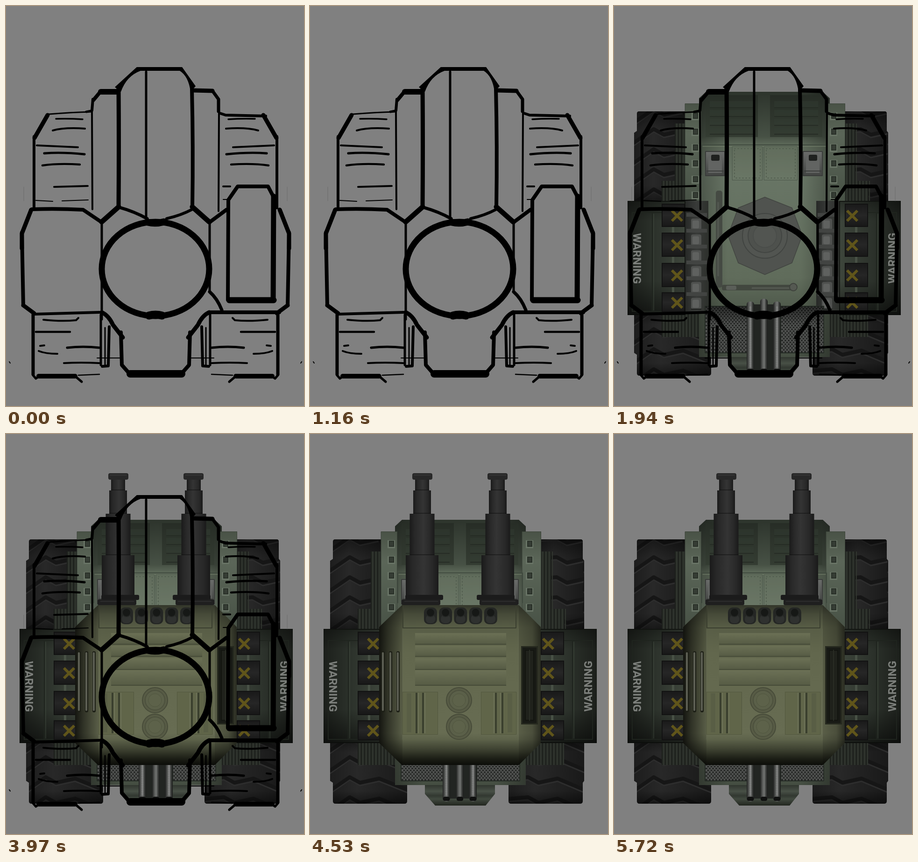
An HTML page with a canvas that plays this animation: 638x858 px, repeating every 6.52 s.

```html
<!DOCTYPE html>
<html lang="en">
<head>
<meta charset="utf-8">
<title>Tank build-up</title>
<style>
html, body { margin: 0; width: 100%; height: 100%; overflow: hidden; background: #808080; }
canvas { display: block; width: 638px; height: 858px; }
</style>
</head>
<body>
<canvas id="stage" width="638" height="858"></canvas>
<script>
const W = 638, H = 858, LOOP = 6520;
let c;

function layer(paint) {
  const cv = document.createElement('canvas');
  cv.width = W; cv.height = H;
  c = cv.getContext('2d');
  c.lineCap = c.lineJoin = 'round';
  paint();
  return cv;
}

function rect(x, y, w, h, fill, edge, lw = 1) {
  c.fillStyle = fill;
  c.fillRect(x, y, w, h);
  if (edge) {
    c.strokeStyle = edge; c.lineWidth = lw;
    c.strokeRect(x + lw / 2, y + lw / 2, w - lw, h - lw);
  }
}
function round(x, y, w, h, r, fill) {
  c.fillStyle = fill;
  c.beginPath(); c.roundRect(x, y, w, h, r); c.fill();
}
function disc(x, y, r, fill, edge, lw = 2) {
  c.beginPath(); c.arc(x, y, r, 0, 7);
  c.fillStyle = fill; c.fill();
  if (edge) { c.strokeStyle = edge; c.lineWidth = lw; c.stroke(); }
}
function shape(d, fill) {
  c.fillStyle = fill;
  c.fill(new Path2D(d));
}
function line(d, w, color) {
  c.strokeStyle = color; c.lineWidth = w;
  c.stroke(new Path2D(d));
}
// Linear gradient; stops alternate position and colour.
function grad(x0, y0, x1, y1, ...stops) {
  const g = c.createLinearGradient(x0, y0, x1, y1);
  for (let i = 0; i < stops.length; i += 2) g.addColorStop(stops[i], stops[i + 1]);
  return g;
}
const across = (x0, x1, ...s) => grad(x0, 0, x1, 0, ...s);
const down = (y0, y1, ...s) => grad(0, y0, 0, y1, ...s);
function mirrored(axis, draw) {
  draw();
  c.save();
  c.translate(2 * axis, 0); c.scale(-1, 1);
  draw();
  c.restore();
}

// ---------- hull ----------
function tyre(d, x0, x1, y0, y1, tilt) {
  c.save();
  c.clip(new Path2D(d));
  rect(x0, y0, x1 - x0, y1 - y0, across(x0, x1, 0, '#1d1d1d', .35, '#282828', 1, '#191919'));
  for (let y = y0 - 8; y < y1 + 60; y += 43) {
    const zig = o => `M${x0} ${y + o + 32 * tilt}L${x0 + 42} ${y + o + 3}L${x0 + 64} ${y + o + 15}L${x0 + 105} ${y + o + 6}L${x1} ${y + o + 30}`;
    line(zig(6), 3, '#2d2d2d');
    line(zig(0), 8, '#161616');
  }
  rect(x0, y0, x1 - x0, y1 - y0, down(y0, y1, 0, '#0006', .2, '#0000', .8, '#0000', 1, '#0007'));
  c.restore();
}

function ribs(x, y, w, h) {
  rect(x, y, w, h, '#282c27');
  for (let i = 0; i < w; i += 7) {
    rect(x + i, y, 2, h, '#1c1f1b');
    rect(x + i + 3, y, 2, h, '#30352e');
  }
}

function crate(x, y, h, markX) {
  rect(x, y, 50, h, down(y, y + h, 0, '#191919', .5, '#262626', 1, '#171717'), '#121212', 2);
  const m = y + h / 2 + 1;
  c.lineCap = 'butt';
  line(`M${markX - 11} ${m - 11}L${markX + 11} ${m + 11}M${markX + 11} ${m - 11}L${markX - 11} ${m + 11}`, 6, '#60551a');
  c.lineCap = 'round';
}

function mesh(x, y, w, h) {
  rect(x, y, w, h, '#5e605e');
  c.fillStyle = '#2c2e2c';
  for (let r = 0; r * 4 < h - 2; r++)
    for (let i = 0; i * 7 < w - 5; i++)
      c.fillRect(x + 2 + i * 7 + (r % 2) * 3.5, y + 1 + r * 4, 4, 3);
  rect(x, y, w, h, down(y, y + h, 0, '#0008', .4, '#0002', 1, '#0002'), '#252b25', 2);
}

function warning(x, y, turn) {
  c.save();
  c.translate(x, y); c.rotate(turn);
  c.font = 'bold 24px Roboto, Arial, sans-serif';
  c.textAlign = 'center';
  c.fillStyle = '#7c7f7b';
  c.fillText('WARNING', 0, 0);
  c.restore();
}

function hull() {
  tyre('M54 226H160V425H43V272L49 268V231Q49 226 54 226Z', 43, 160, 226, 425, 1);
  tyre('M486 226H579Q584 226 584 231V268L587 272V425H486Z', 486, 587, 226, 425, .2);
  tyre('M43 655H208V787Q208 793 202 793H55Q49 793 49 787V748L43 744Z', 43, 208, 655, 793, 1);
  tyre('M425 655H587V744L584 748V787Q584 793 578 793H431Q425 793 425 787Z', 425, 587, 655, 793, .2);

  ribs(130, 252, 24, 126);
  ribs(102, 375, 52, 45);
  ribs(102, 660, 82, 50);
  ribs(494, 252, 22, 126);
  ribs(494, 375, 50, 45);
  ribs(462, 660, 82, 50);

  shape('M246 750H396V772L376 797H268L246 772Z',
    down(750, 797, 0, '#2b302a', .35, '#485046', .55, '#323831', .7, '#41493f', 1, '#22261f'));
  const deck = 'M197 184H447L462 198V753H182V198Z';
  shape(deck, down(184, 753, 0, '#2d342c', .17, '#475145', .2, '#5d6959', .32, '#687565', .7, '#606c5b', .85, '#4a5447', 1, '#454e42'));
  shape(deck, across(182, 462, 0, '#0004', .22, '#0000', .78, '#0000', 1, '#0004'));

  // Rails with square notches
  for (const [x, w, slot] of [[152, 35, 166], [454, 41, 462]]) {
    rect(x, 209, w, 215, down(209, 424, 0, '#495246', .3, '#5b6658', 1, '#475145'), '#3c443a');
    for (let i = 0; i < 6; i++) {
      rect(slot, 228 + i * 34, 16, 17, '#687365');
      rect(slot + 3, 229 + i * 34, 11, 13, '#353c34', '#293028', 2);
    }
  }

  // Engine deck
  for (const x of [196, 334]) {
    rect(x, 191, 112, 90, down(191, 281, 0, '#272d26', 1, '#343c32'));
    for (let i = 0; i < 4; i++) {
      rect(x + 9, 204 + i * 19, 94, 14, '#343c3266');
      rect(x + 9, 217 + i * 19, 94, 2, '#262c25');
    }
  }
  line('M188 298H455M188 298V362M455 298V362', 2, '#3f493e');
  line('M190 301H453', 1, '#78846f');
  for (const [x, w] of [[253, 65], [321, 72]]) {
    rect(x, 301, w, 73, '#6d796733', '#4c574a');
    c.setLineDash([2, 5]);
    line(`M${x + 5} 306h${w - 10}v63h${10 - w}z`, 1.5, '#4c574a');
    c.setLineDash([]);
  }
  for (const x of [195, 404]) {
    rect(x, 311, 43, 54, down(311, 365, 0, '#6b6d6b', .4, '#5a5c5a', 1, '#424442'), '#3a3c3a', 2);
    shape(`M${x + 7} 358V326Q${x + 22} 310 ${x + 36} 326V358Z`, '#626462');
    round(x + 13, 319, 18, 13, 3, '#1f211f');
    line(`M${x + 4} 354H${x + 39}`, 2, '#3a3c3a');
  }

  // Turret ring
  const ring = 'M323 410L381 433L403 492L381 551L323 576L266 551L244 492L266 433Z';
  shape(ring, '#50534f');
  line(ring, 1.5, '#424541');
  disc(323, 493, 48, '#525551', '#414441');
  disc(323, 493, 36, '#4e514d', '#424542');
  disc(323, 493, 25, '#525551', '#4a4d4a');

  // Tools
  round(218, 396, 14, 208, 5, '#454a43');
  round(221, 420, 4, 160, 2, '#50554e');
  round(231, 598, 154, 12, 4, '#42473f');
  round(240, 600, 22, 9, 3, '#5a5e58');
  line('M296 605H374', 3, '#555a52');
  disc(384, 603, 8, '#555952', '#3e423c');

  // Bolt columns
  for (const [x, bx] of [[152, 165], [433, 445]]) {
    rect(x, 418, 50, 242, across(x, x + 50, 0, '#272927', .5, '#393b39', 1, '#2d302c'));
    for (let i = 0; i < 6; i++) {
      const y = 456 + i * 34;
      rect(x + 3, y - 12, 44, 8, '#424442');
      round(bx, y, 22, 24, 4, '#4f514f');
      round(bx + 3, y + 4, 14, 17, 3, '#5f615f');
      rect(bx, y + 23, 22, 3, '#242624');
    }
  }

  // Side armour
  const plate = (x, w, outer, inner) => {
    rect(x, 418, w, 245, across(x, x + w, 0, outer, .5, '#2d332c', 1, inner), '#191d18', 2);
    rect(x, 418, w, 245, down(418, 663, 0, '#0005', .18, '#0000', .7, '#0000', 1, '#0008'));
  };
  plate(29, 124, '#1c1f1b', '#3e463c');
  plate(482, 132, '#3e463c', '#1c1f1b');
  line('M39 443H82V655H39ZM82 443H102M82 655H102', 2, '#1f241e');
  line('M85 446V653', 1, '#414a3f');
  line('M605 443H562V655H605ZM562 443H544M562 655H544', 2, '#1f241e');
  line('M565 446V653', 1, '#414a3f');
  for (const [y, h] of [[424, 50], [486, 52], [551, 52], [614, 43]]) {
    crate(102, y, h, 135);
    crate(494, y, h, 510);
    if (y < 614) {
      rect(124, y + h, 5, 13, '#485145');
      rect(516, y + h, 5, 13, '#485145');
    }
  }
  warning(40.5, 541.5, Math.PI / 2);
  warning(604, 541, -Math.PI / 2);

  // Rear grille and exhausts
  mesh(194, 643, 92, 102);
  mesh(356, 643, 94, 102);
  rect(284, 640, 73, 142, '#222522');
  for (const [x, y] of [[292, 634], [321, 628], [349, 634]]) {
    round(x - 8, y, 16, 154, 6, across(x - 8, x + 8, 0, '#202120', .3, '#585a58', .55, '#727472', .75, '#414341', 1, '#181a18'));
    c.setLineDash([2, 3]);
    if (x !== 321) line(`M${x} ${y + 12}V776`, 4, '#9a9c9a66');
    c.setLineDash([]);
    round(x - 7, 778, 14, 9, 4, '#101110');
  }
}

// ---------- turret ----------
function barrel() {
  const x = 240;
  const metal = (w, y0, y1) => {
    rect(x - w / 2, y0, w, y1 - y0, across(x - w / 2, x + w / 2, 0, '#1a1a1a', .2, '#282828', .55, '#343434', .8, '#292929', 1, '#1a1a1a'));
    rect(x - w / 2, y1 - 3, w, 3, '#1118');
  };
  metal(30, 96, 122);
  metal(38, 121, 172);
  metal(53, 171, 261);
  metal(70, 260, 349);
  round(x - 21, 84, 43, 14, 4, '#282828');
  rect(x - 18, 87, 36, 2, '#363636');
  round(x - 36, 345, 81, 11, 3, '#1b1b1b');
  round(x - 44, 355, 83, 12, 3, '#1f1f1f');
  rect(x - 38, 358, 72, 2, '#2d2d2d');
}

function turret() {
  mirrored(321, barrel);
  const body = 'M197 367H447L494 414V663L447 710H197L148 663V414Z';
  shape(body, down(367, 710, 0, '#33362a', .06, '#474b39', .14, '#585d46', .3, '#62674d', .8, '#676c52', .9, '#4f543f', 1, '#26291c'));
  c.save();
  c.clip(new Path2D(body));
  rect(148, 367, 50, 343, across(148, 198, 0, '#000c', .35, '#0008', 1, '#0002'));
  rect(447, 367, 48, 343, across(447, 495, 0, '#0002', .6, '#0004', 1, '#0009'));
  rect(148, 655, 347, 55, down(655, 710, 0, '#0000', .5, '#0004', 1, '#000a'));
  c.restore();
  line('M199 370V416H441V370', 2, '#3a3e2f');
  line('M198 418V655M446 418V655', 1, '#6c725a66');

  for (const [y, h] of [[427, 23], [454, 22], [481, 23], [507, 31]]) {
    rect(225, y, 195, h, down(y, y + h, 0, '#6b7055', .25, '#666b51', 1, '#575c45'));
    rect(225, y + h, 195, 2, '#464b38');
  }
  mirrored(320, () => {
    rect(198, 553, 76, 92, '#606549', '#52573f');
    for (const x of [226, 240]) {
      rect(x, 555, 4, 87, '#3a3f2e');
      rect(x + 5, 555, 2, 87, '#6c7157');
    }
    rect(207, 556, 10, 84, '#595e45');
  });
  for (const y of [571, 628]) {
    disc(319, y, 27, '#575b45', '#474b39', 2);
    disc(319, y, 21, '#5b6049', '#4c503d', 2);
    disc(319, y, 14, '#5d624a', '#51563f', 1);
  }
  for (const x of [156, 172, 188]) {
    round(x - 3, 466, 7, 131, 3, '#1c1e15');
    round(x - 2, 468, 4, 126, 2, '#5c5e53');
  }
  rect(452, 455, 36, 168, '#181a15', '#25281e', 3);
  rect(460, 463, 20, 152, '#1f211b', '#12140f', 2);
  rect(469, 463, 2, 152, '#2a2d25');
  for (let i = 0; i < 5; i++) {
    const x = 258 + i * 32.2;
    round(x - 14, 372, 28, 36, 10, '#242624');
    round(x - 10, 388, 20, 18, 8, '#2f312f');
    disc(x, 383, 9, '#161816', '#252725');
  }
}

// ---------- sketch ----------
const bothSides = [
  [9, 'M89 234L61 283'], [6, 'M60 280V433'],
  [3.5, 'M107 242Q135 241 164 243'], [4, 'M100 267Q125 260 169 263'],
  [4, 'M66 299Q110 301 154 303'], [5, 'M82 316Q120 313 168 318'],
  [4.5, 'M78 342Q112 337 158 340'],
  [9, 'M54 437L34 488V520'], [8, 'M34 486L37 642'], [9, 'M37 642L60 659'],
  [7, 'M58 662V790'], [10, 'M70 794H148'], [5, 'M148 794L162 806M58 792L64 799L70 795'],
  [2.5, 'M155 792L200 790'],
  [4, 'M80 673Q120 677 150 674L155 669'], [4.5, 'M64 699H137'],
  [4, 'M73 729L82 728M70 740Q84 746 110 746'], [5, 'M131 733Q165 729 200 733'],
  [4, 'M124 766Q160 764 200 766'],
  [5, 'M203 662V770'], [9, 'M205 657Q220 664 229 684L250 711'],
  [6, 'M221 688L219 772L206 773'], [3, 'M212 690V770'], [2, 'M195 755H245'],
  [8, 'M246 700L248 770L262 786'], [11, 'M241 431L205 463'],
  [2, 'M7 763L9 766']
];
const single = [
  [12, 'M238 184H203'], [8, 'M202 184L187 202'], [6, 'M186 200L184 224'], [4, 'M184 222L185 436'],
  [9, 'M241 174Q242 300 241 432'], [8, 'M398 178Q401 300 399 432'],
  [9, 'M402 181L442 182'], [7, 'M442 182L455 200V226'], [4, 'M456 226L455 440'],
  [5, 'M300 141V452'], [7, 'M243 432Q275 441 302 456'], [6, 'M399 436Q375 449 344 456'],
  [15, 'M304 464Q320 468 338 463'],
  [3, 'M92 232Q140 228 182 227'], [5, 'M172 227L182 225'], [6, 'M458 230L470 234L556 236'],
  [4, 'M103 388L175 386M465 387H480'], [2, 'M64 417L100 419M120 418L176 416M465 415H475'],
  [8, 'M56 436Q110 434 165 437L205 464'], [5, 'M205 465V672'], [6, 'M60 661L200 657'],
  [8, 'M437 463L472 437'], [5, 'M436 465V612'], [7, 'M436 613Q452 627 462 652'],
  [8, 'M438 657H585'],
  [8, 'M475 630L476 416L496 387H561L573 410'], [11, 'M573 408L572 630'], [13, 'M478 631H573'],
  [16, 'M266 789H376'],
  [17, 'M306 664Q320 660 334 664']
];
function sketch() {
  c.filter = 'blur(0.7px)';
  mirrored(320, () => bothSides.forEach(([w, d]) => line(d, w, '#000')));
  single.forEach(([w, d]) => line(d, w, '#000'));
  shape('M280 131H377L406 172L395 184Q391 151 372 139H288Q258 150 246 184L233 174Z', '#000');
  c.lineWidth = 13;
  c.beginPath();
  c.ellipse(320, 564, 115, 101, 0, 0, 7);
  c.stroke();
  c.filter = 'none';
  line('M38 388V418M602 388V418', 1, '#6d6d6d');
}

// ---------- playback ----------
const art = { hull: layer(hull), turret: layer(turret), sketch: layer(sketch) };
const scenes = [
  [1940, ['sketch']],
  [3140, ['hull', 'sketch']],
  [4530, ['hull', 'turret', 'sketch']],
  [LOOP, ['hull', 'turret']]
];
const out = document.getElementById('stage').getContext('2d');
const start = performance.now();

function play() {
  const t = Math.max(0, performance.now() - start) % LOOP;
  out.fillStyle = '#808080';
  out.fillRect(0, 0, W, H);
  for (const name of scenes.find(s => t < s[0])[1]) out.drawImage(art[name], 0, 0);
  requestAnimationFrame(play);
}
play();
</script>
</body>
</html>
```
